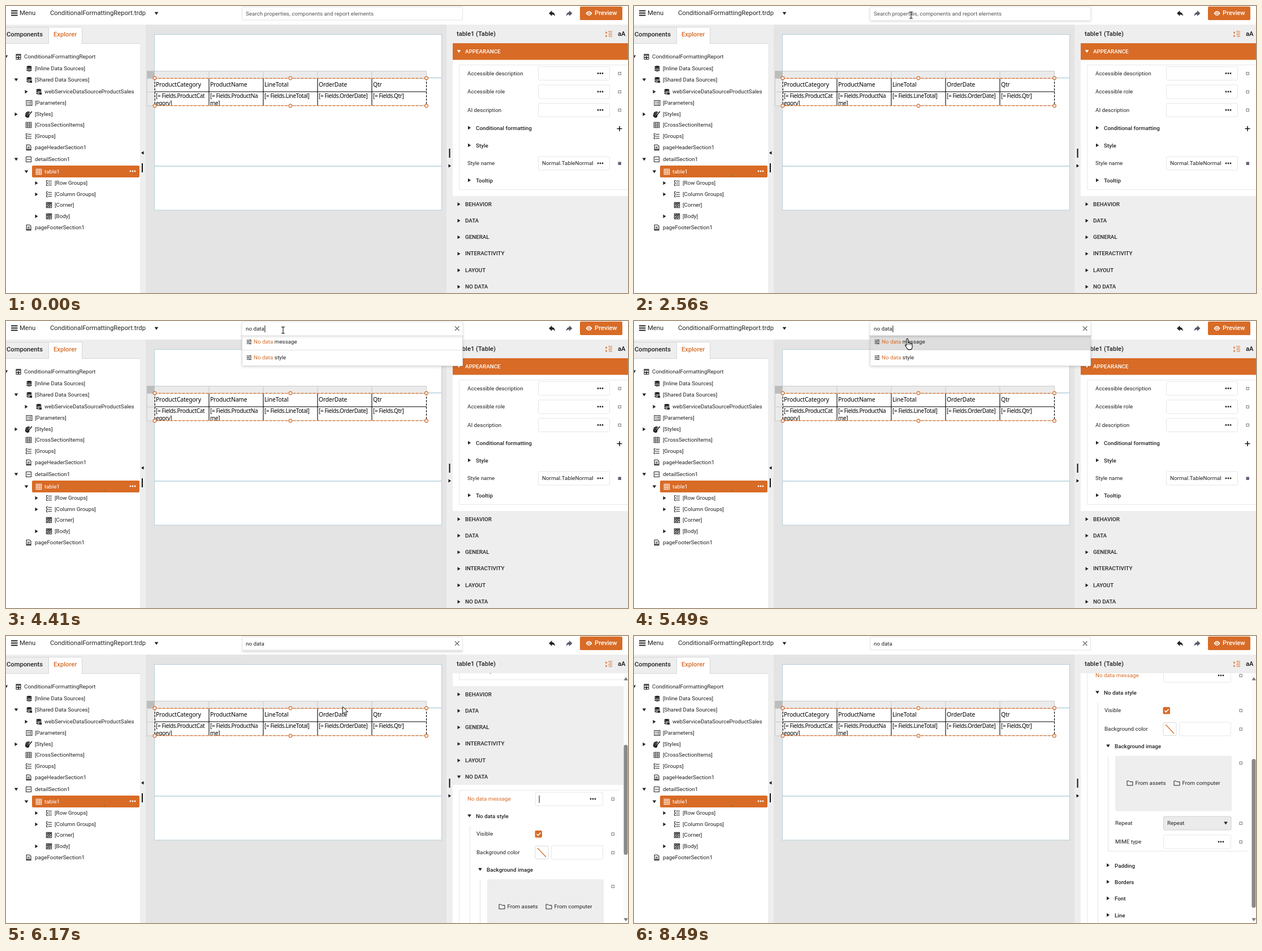
Recreate the animation shown at these times as an HTML page. Size 1100 px wide and 509 px high, loop 8550 ms.

```html
<!DOCTYPE html>
<html lang="en">
<head>
<meta charset="utf-8">
<title>Report designer</title>
<style>
html, body { margin: 0; width: 100%; height: 100%; overflow: hidden; background: #fff; }
svg { display: block; width: 1100px; height: 509px; }
text { font: 9.8px Roboto, sans-serif; fill: #222; white-space: pre; }
.big { font-size: 11.3px; }
.med { font-weight: 500; }
.bigmed { font-size: 11.2px; font-weight: 500; }
.head { font: 10.4px "Noto Sans", sans-serif; letter-spacing: -.18px; fill: #000; }
.cell { font: 10px "Noto Sans", sans-serif; letter-spacing: -.37px; fill: #000; }
</style>
</head>
<body>
<svg id="stage" viewBox="0 0 1100 509"></svg>
<script>
const ORANGE = '#d86b26', GREY = '#eeeeee', INK = '#222';
const LOOP = 8550;

// Shape helpers
const rect = (x, y, w, h, fill = 'none', stroke = 'none', r = 0, extra = '') =>
  `<rect x="${x}" y="${y}" width="${w}" height="${h}" fill="${fill}" stroke="${stroke}" rx="${r}" ${extra}/>`;
const path = (d, stroke = INK, w = 1, fill = 'none', dash = 'none') =>
  `<path d="${d}" stroke="${stroke}" stroke-width="${w}" fill="${fill}" stroke-dasharray="${dash}"/>`;
// y is the middle of the capitals; baselines sit on whole pixels
const text = (x, y, s, cls = '', fill = '') =>
  `<text x="${x}" y="${Math.round(y + (cls.startsWith('big') ? 3.5 : 3))}" class="${cls}"${fill && ` style="fill:${fill}"`}>${s}</text>`;
const at = (x, y, s) => `<g transform="translate(${x} ${y})">${s}</g>`;
const group = (id, s) => `<g id="${id}">${s}</g>`;
const right = (x, y, c = INK) => path(`M${x - 2.5} ${y - 3.2}l5 3.2l-5 3.2z`, 'none', 0, c);
const down = (x, y, c = INK) => path(`M${x - 3.3} ${y - 2.5}h6.6l-3.3 5z`, 'none', 0, c);
const dots = (x, y, c = INK) => [-4, 0, 4].map(d => `<circle cx="${x + d}" cy="${y}" r="1.4" fill="${c}"/>`).join('');

const icons = {
  db: () => `<ellipse cy="-3" rx="4.5" ry="2" fill="${INK}"/>` +
    path('M-4.5 -1.5q4.5 2.6 9 0v2q-4.5 2.6 -9 0zM-4.5 1.6q4.5 2.6 9 0v2q-4.5 2.6 -9 0z', 'none', 0, INK),
  shared: () => icons.db() + rect(0, 1, 5.5, 4.5, INK, '#fff', 0, 'stroke-width=".8"'),
  report: () => rect(-4, -4.5, 8, 9, 'none', INK) + path('M-4 -2.8h8M-4 1.2h8M0 -1v5.5', INK, 1.6),
  params: () => rect(-5, -4.5, 10, 9, 'none', INK) + path('M-3 -1.5h2M0 -1.5h3.5M-3 1.8h2M0 1.8h3.5', INK, 1.3),
  styles: () => path('M-5.5 0a5 4.5 0 0 1 8 -4l-3 4l2 4a4 4 0 0 1 -7 -4z', 'none', 0, INK) +
    path('M5.8 -5l-4.5 5.5l-1.5 3', INK, 1.7) + path('M-3.5 -1h1M-1.5 -3h1M-3 2h1', '#fff', 1.2),
  grid: (c = INK) => rect(-4.7, -4.7, 9.4, 9.4, 'none', c) + path('M-4.7 -1.6h9.4M-4.7 1.6h9.4M-1.6 -4.7v9.4M1.6 -4.7v9.4', c, .9),
  groups: () => path('M-1.5 -3.5h6.5M-1.5 0h6.5M-1.5 3.5h6.5M-2 -4.5h-2.5v3.5h2.5M-2 1h-2.5v3.5h2.5', INK, 1),
  page: () => path('M-3.8 -4.8h5.4l2.4 2.4v7.2h-7.8z', INK, 1.1) + path('M-2 -1h4M-2 1h4M-4 3.4h8', INK, 1.2),
  detail: () => rect(-4.5, -4.5, 9, 9, 'none', INK) + path('M-3 0h1.5M-.7 0h1.5M1.6 0h1.5', INK, 1.3),
  body: () => icons.grid() + path('M-4.5 -3h9M-4 4l8 -8M-4 0l4 -4M0 4l4 -4', INK, .9),
  sliders: () => path('M-4.5 -3h9M-4.5 0h9M-4.5 3h9M2 -4.3v2.6M-2 -1.3v2.6M1.5 1.7v2.6', INK, 1),
  folder: () => path('M-5 -4h3.5l1.5 1.6h5v6.4h-10z', INK, 1)
};
const icon = (name, x, y, c) => at(x, y, icons[name](c));

function topBar() {
  return rect(0, 0, 1100, 33, '#fff') +
    path('M9 8.5h11.5M9 12.5h11.5M9 16.5h11.5', INK, 2) + text(24, 12.7, 'Menu', 'big') +
    text(78, 12.7, 'ConditionalFormattingReport.trdp', 'big') + down(266, 13.3) +
    path('M960 13l5.5 -5v3q5 .3 5.5 7q-2 -3 -5.5 -3v3z', 'none', 0, INK) +
    path('M1001.5 13l-5.5 -5v3q-5 .3 -5.5 7q2 -3 5.5 -3v3z', 'none', 0, '#555b66') +
    rect(1015, 1, 75, 24, ORANGE, 'none', 2) +
    path('M1025.5 13q5.5 -8 11 0q-5.5 8 -11 0z', 'none', 0, '#fff') +
    `<circle cx="1031" cy="13" r="2" fill="#fff" stroke="${ORANGE}" stroke-width="1.2"/>` +
    text(1041, 12.7, 'Preview', 'bigmed', '#fff');
}

// label, y, text x, icon, icon x, arrow x, expanded
const tree = [
  ['ConditionalFormattingReport', 90, 32, 'report', 22, 0, 1],
  ['[Inline Data Sources]', 111, 51, 'db', 41],
  ['[Shared Data Sources]', 131, 51, 'shared', 41, 18, 1],
  ['webServiceDataSourceProductSales', 152, 68, 'shared', 58, 36],
  ['[Parameters]', 172, 51, 'params', 41],
  ['[Styles]', 192, 51, 'styles', 40, 18],
  ['[CrossSectionItems]', 211, 51, 'grid', 40],
  ['[Groups]', 231, 51, 'groups', 40],
  ['pageHeaderSection1', 251, 51, 'page', 40],
  ['detailSection1', 272, 51, 'detail', 40, 18, 1],
  ['table1', 294, 68, 'grid', 58, 36, 1],
  ['[Row Groups]', 314, 86, 'groups', 76, 54],
  ['[Column Groups]', 334, 86, 'groups', 76, 54],
  ['[Corner]', 353, 86, 'body', 76],
  ['[Body]', 373, 86, 'body', 76, 54],
  ['pageFooterSection1', 393, 51, 'page', 40]
];

function explorer() {
  const rows = tree.map(([label, y, x, name, ix, ax, open]) => {
    const c = label === 'table1' ? '#fff' : '';
    return text(x, y, label, '', c) + icon(name, ix, y, c || INK) +
      (ax === undefined ? '' : (open ? down : right)(ax, y));
  }).join('');
  return rect(0, 33, 237, 476, '#fff') + rect(0, 33, 237, 33, GREY) +
    path('M0 37.5h75.5v28', '#d6d6d6') + rect(75.5, 37.5, 59, 30, '#fff', '#d6d6d6', 1) +
    path('M0 66.5h75M135 66.5h102', '#d6d6d6') + rect(76, 65, 58, 4, '#fff') +
    text(1, 50.5, 'Components', 'bigmed') + text(84, 50.5, 'Explorer', 'bigmed', ORANGE) +
    rect(46, 283, 190, 21, ORANGE, 'none', 2) + dots(224, 293, '#fff') + rows +
    group('speck', rect(172.5, 299.5, 2.5, 2, '#8d6a3c'));
}

function canvasArea() {
  const cols = [263, 359, 455, 551, 647];
  const names = ['ProductCategory', 'ProductName', 'LineTotal', 'OrderDate', 'Qtr'];
  const cells = ['[= Fields.ProductCat', '[= Fields.ProductNa', '[= Fields.LineTotal]', '[= Fields.OrderDate]', '[= Fields.Qtr]'];
  const handles = [[263, 128], [503, 128], [743.5, 128], [263, 177], [503, 177], [743.5, 177]];
  const across = 'M263 128.3h481M263 176.7h481', sides = 'M263.3 128v49M743.5 128v49';
  return rect(237, 33, 10, 476, GREY) + rect(247, 33, 532, 476, '#e4e4e4') + rect(779, 33, 11, 476, GREY) +
    rect(262.5, 50.5, 508, 311.5, '#fff', '#b5d0dc') + path('M263 127.5h508M263 284h508', '#b5d0dc', 1.3) +
    rect(249.5, 115.5, 494, 13, '#ebebeb', '#c9c9c9') + rect(249.5, 128.5, 13.5, 48.5, '#ebebeb', '#c9c9c9') +
    rect(249, 115, 14, 13, '#bdbdbd') + path('M249 152.5h14', '#c9c9c9') +
    rect(263, 128, 481, 49, '#fff') +
    cols.slice(1).map(x => path(`M${x} 115v13`, '#c9c9c9') + path(`M${x} 128v49`, '#000', 1.1)).join('') +
    path('M263 152h481', '#000', 1.1) +
    `<g clip-path="url(#tableClip)">` +
    cols.map((x, i) => text(x + 2, 140, names[i], 'head') + text(x + 2, 159.5, cells[i], 'cell')).join('') +
    text(265, 173, 'egory]', 'cell') + text(361, 173, 'me]', 'cell') + '</g>' +
    path(across, '#c9a890', 1) + path(across, ORANGE, 1.2, 'none', '4 3') +
    path(sides, '#000', 1.1, 'none', '4 2') +
    handles.map(([x, y]) => `<circle cx="${x}" cy="${y}" r="2.8" fill="#fff" stroke="${ORANGE}" stroke-width="1.2"/>`).join('') +
    path('M243.5 257.5v6l-4.5 -3z', 'none', 0, '#111') + rect(240, 279, 2, 16, '#111') +
    rect(783.5, 253, 2, 16, '#111') + path('M782.5 280.5v6l4.5 -3z', 'none', 0, '#111');
}

// Property list in unscrolled coordinates
function properties(open) {
  const left = open ? 936 : 941, end = open ? 1056 : 1068, sq = open ? 1073 : 1085, more = open ? 1038 : 1051;
  const edge = open ? 1092 : 1100;
  const square = (y, fill = '#fff', stroke = '#777') => rect(sq - 2, y - 2, 4.4, 4.4, fill, stroke);
  const input = (y, x = left) => rect(x + .5, y - 12, end - x - 1, 24, '#fff', '#e6e6e6', 2);
  const field = (x, y, label, fill) => text(x, y, label, '', fill) + input(y) + dots(more, y) + square(y);
  const heading = (x, y, label, arrow = right) => arrow(x - 11.5, y - 1) + text(x, y, label, 'med');
  const sections = ['BEHAVIOR', 'DATA', 'GENERAL', 'INTERACTIVITY', 'LAYOUT', 'NO DATA'];

  let s = rect(790, 66, edge - 790, 900, '#fff') + rect(790, 66, edge - 790, 29.5, ORANGE) +
    down(801, 80.5, '#fff') + text(812, 80.5, 'APPEARANCE', 'med', '#fff') +
    path(`M${edge} 104.5H801.5V325.5H${edge}`, '#e8e8e8') +
    field(816, 119.5, 'Accessible description') + field(816, 152, 'Accessible role') + field(816, 184.5, 'AI description') +
    heading(831, 217, 'Conditional formatting') + path(`M${sq - 4.5} 217.5h9M${sq} 213v9`, '#111', 1.5) +
    heading(831, 248, 'Style') + text(816, 279, 'Style name') + input(279) +
    text(left + 7, 279, 'Normal.TableNormal') + dots(more, 279) + square(279, '#666078', '#666078') +
    heading(831, 310, 'Tooltip') + rect(790, 337, edge - 790, 175, GREY) +
    sections.map((n, i) => (open && i === 5 ? down : right)(801, 351.5 + i * 29.3) + text(812, 351.5 + i * 29.3, n, 'med')).join('');
  if (!open) return s;

  const folder = (x, label) => icon('folder', x, 728) + text(x + 9.5, 728, label);
  return s + path('M1085 521.5H801.5V980', '#e8e8e8') + field(816, 537, 'No data message', ORANGE) +
    group('fieldCaret', rect(942.6, 531, 1, 13, '#111')) +
    heading(831, 568, 'No data style', down) + path('M820.5 585V980M838.5 680V848.5H1085', '#e4e4e4') +
    text(832, 599, 'Visible') + rect(935.5, 593, 12.5, 12.5, ORANGE, 'none', 2) + path('M938.5 599.3l2.4 2.6l4.6 -5', '#fff', 1.6) + square(599) +
    text(832, 632, 'Background color') + rect(936, 620.5, 23, 23, '#fff', '#d9d9d9', 2) + path('M940 624l15 16', ORANGE, 1.2) + input(632, 964) + square(632) +
    heading(850, 663, 'Background image', down) + rect(851, 679.5, 206, 98, GREY, 'none', 3) +
    folder(877, 'From assets') + folder(960, 'From computer') + square(692) +
    text(851, 799, 'Repeat') + rect(936.5, 787, 119.5, 24, '#ebebeb', '#cfcfcf', 2) + text(943, 799, 'Repeat') + down(1046.5, 799) + square(799) +
    text(851, 832, 'MIME type') + input(832) + dots(more, 832) + square(832) +
    ['Padding', 'Borders', 'Font', 'Line'].map((n, i) => heading(850, 874.5 + i * 29.4, n)).join('');
}

function panel() {
  const bar = rect(1092, 66, 8, 443, '#fafafa') + path('M1092.5 78.5l3.7 -5.5l3.7 5.5zM1092.5 500.5l3.7 5.5l3.7 -5.5z', 'none', 0, '#777') +
    rect(1092.5, 0, 7, 10, '#8a8a8a', 'none', 3.5, 'id="thumb"');
  return `<g clip-path="url(#panelClip)">` + group('closedList', properties(false)) +
    group('openList', group('scroller', properties(true)) + bar) + '</g>' +
    rect(790, 33, 310, 33, GREY) + text(797, 49, 'table1 (Table)', 'bigmed') +
    path('M1060.5 45l3 2.2l-3 2.2zM1060.5 51l3 2.2l-3 2.2z', 'none', 0, ORANGE) +
    path('M1065 45h7M1066 48h6M1065 51h7M1066 54h6', ORANGE, 1.2) + text(1082, 49.5, 'aA', 'bigmed', '#111');
}

function search() {
  const item = (y, rest) => icon('sliders', 430, y) +
    text(438, y, `<tspan fill="${ORANGE}">No data</tspan> ${rest}`);
  return `<g clip-path="url(#popupClip)">` + group('popup',
      rect(417.5, 20, 390, 59.5, '#fff', '#d9d9d9', 1, 'filter="url(#shadow)"') +
      rect(418, 26, 389, 25, '#dedede', '#cfcfcf', 0, 'id="itemHover"') +
      path('M418 51.5h389', '#e2e2e2') + item(37, 'message') + item(65, 'style')) + '</g>' +
    rect(417.5, 1.5, 390, 23.5, '#fff', '#e2e2e2', 2) +
    group('focusBox', rect(417.5, 1.5, 390, 24, '#fff', '#ececec', 1, 'filter="url(#shadow)"')) +
    text(424, 13.5, '<tspan id="query"></tspan>') + rect(424, 8, 1, 12, '#111', 'none', 0, 'id="caret"') +
    group('clear', path('M794 9.5l7.5 7.5M801.5 9.5l-7.5 7.5', '#777', 1.6));
}

const cursors = {
  hand: path('M-1.2 1.5q0 -1.5 1.3 -1.5t1.4 1.5v6q2 -1 2.7 .5q2 -.6 2.6 .7q2 -.4 2.1 1.6v4q0 3 -2 5h-5.6q-2.6 -3.5 -5 -7.5q.2 -2 2.5 -.2z', '#111', 1.1, '#fff') +
    path('M1.6 8v3.5M4.2 8.3v3.2M6.7 9v2.8', '#111', .8),
  arrow: path('M0 0v13l3 -2.8l2.2 5.2l2.2 -1l-2.2 -5h4.2z', '#111', 1, '#fff'),
  beam: path('M-3 -5.5h2l1 1l1 -1h2M0 -4.5v9.5M-3 6h2l1 -1l1 1h2', '#111', 1.1)
};

const stage = document.getElementById('stage');
stage.innerHTML = `<defs>
  <clipPath id="tableClip">${rect(263, 128, 481, 48.5, '#000')}</clipPath>
  <clipPath id="panelClip">${rect(790, 66, 310, 443, '#000')}</clipPath>
  <clipPath id="popupClip">${rect(405, 25, 420, 75, '#000')}</clipPath>
  <filter id="shadow" x="-5%" y="-30%" width="110%" height="190%"><feDropShadow dx="0" dy="1.5" stdDeviation="2" flood-opacity=".15"/></filter>
</defs>` + topBar() + explorer() + canvasArea() + panel() + search() +
  '<circle id="press" r="9.8" fill="#ecb500" fill-opacity=".85"/>' +
  group('cursor', Object.entries(cursors).map(([k, s]) => group(k, s)).join(''));

const el = {};
stage.querySelectorAll('[id]').forEach(n => el[n.id] = n);

// Timeline: time, x, y, pointer shape
const moves = [
  [0, 0, 0, ''], [70, 1005, 492, 'arrow'], [230, 640, 440, 'arrow'], [400, 250, 345, 'arrow'], [440, 215, 325, 'hand'],
  [590, 173, 299, 'hand'], [1250, 173, 299, 'hand'], [1340, 240, 240, 'arrow'], [1560, 430, 90, 'arrow'],
  [1740, 484, 32, 'arrow'], [1810, 488, 20, 'beam'], [1900, 490, 16, 'beam'], [5340, 490, 16, 'beam'],
  [5470, 484, 30, 'hand'], [5700, 475.5, 45, 'hand'], [6060, 475.5, 45, 'hand'], [6110, 520, 75, 'arrow'],
  [6280, 730, 215, 'arrow'], [6430, 862, 283, 'arrow'], [6800, 862, 283, 'arrow'], [6980, 1000, 255, 'arrow'],
  [7120, 1055, 310, 'arrow'], [7330, 890, 385, 'arrow'], [7480, 765, 350, 'arrow'], [7620, 898, 398, 'arrow'],
  [7690, 905, 440, 'arrow'], [7760, 0, 0, '']
];
const presses = [[920, 1180, 173, 299], [2010, 2150, 488, 16], [5900, 6000, 475, 45]];
const keys = [[0, 0], [2890, 1], [3020, 2], [3220, 3], [3420, 4], [3690, 5], [3820, 6], [4020, 7]];
const caretX = [424, 430, 435.4, 438, 443.4, 449, 452, 457.4];
const caretOn = [[2030, 2560], [2890, 4550], [5070, 5600]];
const fieldOn = [[5960, 6600], [7160, 7690], [8220, 8490]];

const show = (node, on) => node.setAttribute('visibility', on ? 'inherit' : 'hidden');
const within = (t, spans) => spans.some(([a, b]) => t >= a && t < b);
const ramp = (t, a, b) => Math.min(1, Math.max(0, (t - a) / (b - a)));
const ease = p => p * p * (3 - 2 * p);

function draw(t) {
  const i = moves.findLastIndex(m => m[0] <= t);
  const [t0, x0, y0, shape] = moves[i];
  const [t1, x1, y1, nextShape] = moves[i + 1] || moves[i];
  const p = shape && nextShape ? ramp(t, t0, t1) : 0;
  el.cursor.setAttribute('transform', `translate(${x0 + (x1 - x0) * p} ${y0 + (y1 - y0) * p})`);
  for (const k in cursors) show(el[k], k === shape);

  const press = presses.find(([a, b]) => t >= a && t < b);
  show(el.press, press);
  if (press) el.press.setAttribute('transform', `translate(${press[2]} ${press[3]})`);
  show(el.speck, t >= 1180);

  const typed = keys.findLast(k => k[0] <= t)[1];
  el.query.textContent = typed ? 'no data'.slice(0, typed) : 'Search properties, components and report elements';
  el.query.style.fill = typed ? INK : '#555';
  el.caret.setAttribute('x', caretX[typed]);
  show(el.caret, within(t, caretOn));
  show(el.focusBox, t >= 2030 && t < 6100);
  show(el.clear, t >= 4280);

  const drop = 1 - (1 - ramp(t, 4260, 4400)) ** 2 - ramp(t, 5970, 6180) ** 1.2;
  show(el.popup, t >= 4280 && t < 6180);
  el.popup.setAttribute('transform', `translate(0 ${-56 * (1 - drop)})`);
  show(el.itemHover, t >= 5470 && t < 6180);

  const open = t >= 5900, roll = ease(ramp(t, 6440, 6650));
  show(el.closedList, !open);
  show(el.openList, open);
  show(el.fieldCaret, open && within(t, fieldOn));
  el.scroller.setAttribute('transform', `translate(0 ${-248 - 219 * roll})`);
  el.thumb.setAttribute('y', 193 + 25 * roll);
  el.thumb.setAttribute('height', 195 + 69 * roll);
}

const start = performance.now();
function tick() {
  draw((performance.now() - start) % LOOP);
  requestAnimationFrame(tick);
}
tick();
</script>
</body>
</html>
```
